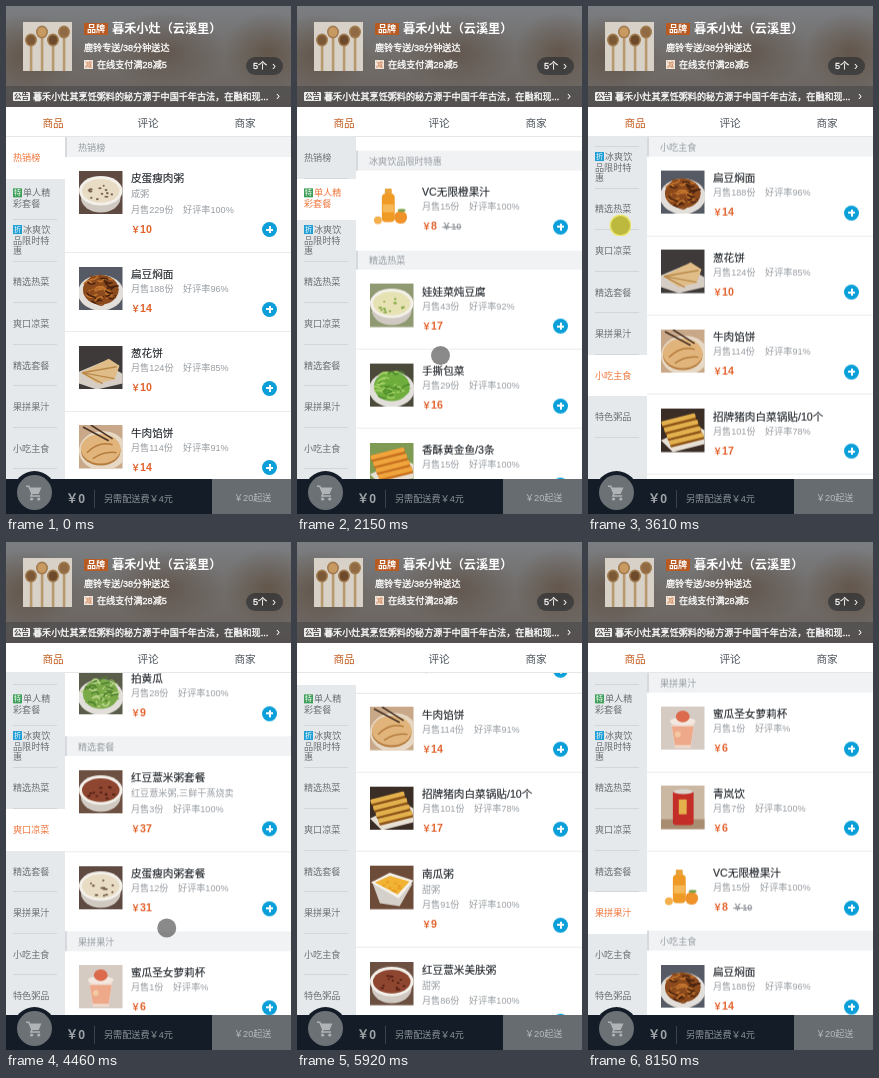
An HTML page that plays this animation: 285x508 px, repeating every 8.85 s.

```html
<!DOCTYPE html>
<html>
<head>
<meta charset="utf-8">
<title>点餐</title>
<style>
html, body { margin: 0; width: 100%; height: 100%; overflow: hidden; background: #fff; }
#stage { position: relative; width: 285px; height: 508px; overflow: hidden; background: #fff;
  font-family: "Liberation Sans", "Noto Sans CJK SC", "Noto Sans CJK", sans-serif; }
#stage div, #stage svg { position: absolute; }
.t { line-height: 14px; white-space: nowrap; }
.mid { transform: translateX(-50%); }
.b { font-weight: 700; }
.thick { -webkit-text-stroke: .3px; }
.head { left: 0; top: 0; width: 285px; height: 101px; color: #fff; overflow: hidden;
  background:
    radial-gradient(ellipse 50px 40px at 22px 48px, rgba(92,74,58,.65), transparent),
    radial-gradient(ellipse 60px 40px at 160px 45px, rgba(88,72,60,.6), transparent),
    radial-gradient(ellipse 45px 40px at 262px 46px, rgba(92,74,58,.65), transparent),
    linear-gradient(#7b7e82, #716d6a 50%, #6a635e); }
.brand { left: 78px; top: 17px; width: 24px; height: 12px; background: #b95a22; }
.cut { left: 78px; top: 54px; width: 9px; height: 9px; background: #f1e4d8; }
.pill { left: 240px; top: 51px; width: 37px; height: 18px; border-radius: 9px; background: rgba(7,17,27,.4); }
.notice { left: 0; top: 80px; width: 285px; height: 21px; background: rgba(7,17,27,.22); }
.tag { left: 7px; top: 86px; width: 17px; height: 9px; background: #eee; border-radius: 1px; }
.tabline { left: 0; top: 130px; width: 285px; height: 1px; background: #e4e6e8; }
.view { top: 131px; height: 342px; overflow: hidden; }
#menuView { left: 0; width: 59px; background: #e6e9eb; }
#listView { left: 59px; width: 226px; background: #fff; }
#menu, #list { left: 0; top: 0; will-change: transform; }
.entry { left: 0; width: 59px; height: 41.55px; font-size: 9.12px; line-height: 10.64px; color: #6b7075; }
.entry p { position: absolute; margin: 0; left: 7px; width: 43px; top: 50%; transform: translateY(-50%); }
.entry i { display: inline-block; width: 9px; height: 9px; margin-right: 1px; font: 7px/9px "Noto Sans CJK SC", sans-serif;
  color: #fff; text-align: center; vertical-align: top; }
.entry::after { content: ""; position: absolute; left: 7px; width: 44px; bottom: 0; height: 1px; background: #d2d6d9; }
.entry.on { background: #fff; color: #f0763c; }
.entry.on::after { display: none; }
.bar { left: 0; width: 224px; height: 19.8px; background: #f0f2f4; border-left: 2px solid #d6dade; }
.rule { left: 0; width: 226px; height: 1px; background: #e9ebed; }
.plus { left: 197px; width: 15px; height: 15px; border-radius: 50%; background: #0a9fd9; }
.plus::before, .plus::after { content: ""; position: absolute; background: #fff; }
.plus::before { left: 4px; top: 6.5px; width: 7px; height: 2px; }
.plus::after { left: 6.5px; top: 4px; width: 2px; height: 7px; }
.name { color: #22272c; -webkit-text-stroke: .15px; }
.grey { color: #989da2; }
.price { color: #e2622c; font-weight: 700; }
.price small { font-size: 9.12px; }
.price s { font-size: 9.12px; color: #989da2; margin-left: 5px; }
.foot { left: 0; top: 473px; width: 285px; height: 35px; background: #141d27; }
.pay { left: 206px; top: 0; width: 79px; height: 35px; background: #676c71; }
.ring { left: 7px; top: 465px; width: 43px; height: 43px; border-radius: 50%; background: #141d27; }
.cart { left: 11px; top: 469px; width: 35px; height: 35px; border-radius: 50%; background: #6c7176; }
#dot { left: -9.5px; top: -9.5px; width: 19px; height: 19px; border-radius: 50%; background: rgba(70,70,70,.63); }
#dot.press { background: #bdb83e; box-shadow: 0 0 0 1.5px rgba(236,228,80,.8); }
</style>
</head>
<body>
<div id="stage">
  <div class="view" id="menuView"><div id="menu"></div></div>
  <div class="view" id="listView"><div id="list"></div></div>
  <div class="head" id="head">
    <svg style="left:17px;top:16px" width="49" height="49" id="avatar"></svg>
    <div class="brand"></div><div class="cut"></div><div class="pill"></div>
    <div class="notice"></div><div class="tag"></div>
  </div>
  <div id="tabs"></div><div class="tabline"></div>
  <div class="foot" id="foot">
    <div class="pay"></div>
    <div style="left:88px;top:11px;width:1px;height:18px;background:#3a424a"></div>
  </div>
  <div class="ring"></div><div class="cart"></div>
  <svg style="left:20px;top:479px" width="17" height="17" viewBox="0 0 17 17">
    <path d="M0 1.2H2.8L6 8.6 5 11H14" fill="none" stroke="#b0b4b7" stroke-width="1.6"/>
    <path d="M3.6 2.5H15.5L12.6 9H6.2Z" fill="#b0b4b7"/>
    <circle cx="5.6" cy="14" r="1.6" fill="#b0b4b7"/><circle cx="12.8" cy="14" r="1.6" fill="#b0b4b7"/>
  </svg>
  <div id="dot"></div>
</div>
<script>
const $ = id => document.getElementById(id);

function add(parent, cls, css, html = '') {
  const el = document.createElement('div');
  el.className = cls;
  el.style.cssText = css;
  el.innerHTML = html;
  parent.append(el);
  return el;
}
// Text line, vertically centred on cy
const text = (parent, x, cy, size, html, cls = '', color = '') =>
  add(parent, 't ' + cls, `left:${x}px;top:${cy - 7}px;font-size:${size}px;color:${color}`, html);

// Static chrome
const S = 9.12, M = 10.64, L = 12.16;
const head = $('head'), tabs = $('tabs'), foot = $('foot');
text(head, 81, 23, S, '品牌', 'b');
text(head, 106, 23, L, '暮禾小灶（云溪里）', 'b');
text(head, 78, 42, S, '鹿铃专送/38分钟送达', 'thick');
text(head, 79, 58.5, 7, '减', '', '#c9703c');
text(head, 91, 58.5, S, '在线支付满28减5', 'thick');
text(head, 247, 60, S, '5个', 'thick');
text(head, 266, 59.5, 12, '›');
text(head, 8, 90.5, 7.5, '公告', 'b', '#4a4542');
text(head, 27, 91, S, '暮禾小灶其烹饪粥料的秘方源于中国千年古法，在融和现...', 'thick');
text(head, 270, 90, 12, '›');
text(tabs, 47, 117, M, '商品', 'mid', '#c25a1c');
text(tabs, 142, 117, M, '评论', 'mid', '#4d555d');
text(tabs, 239, 117, M, '商家', 'mid', '#4d555d');
text(foot, 60, 20, L, '￥0', 'b', '#a1a5a9');
text(foot, 98, 20, S, '另需配送费￥4元', '', '#8d9297');
text(foot, 228, 19, S, '￥20起送', '', '#b9bcbf');

// Small food pictures
let seed = 1;
const rnd = (a, b) => {
  seed = seed * 16807 % 2147483647;
  return a + (b - a) * seed / 2147483647;
};
const oval = (x, y, rx, ry, fill) => `<ellipse cx="${x}" cy="${y}" rx="${rx}" ry="${ry}" fill="${fill}"/>`;
const box = (x, y, w, h, fill, r = 0) => `<rect x="${x}" y="${y}" width="${w}" height="${h}" rx="${r}" fill="${fill}"/>`;
const path = (d, fill) => `<path d="${d}" fill="${fill}"/>`;
const line = (d, color, w) => `<path d="${d}" fill="none" stroke="${color}" stroke-width="${w}"/>`;
const many = (n, f) => Array.from({ length: n }, (_, i) => f(i)).join('');
const spot = (rx, ry) => {
  const a = rnd(0, 6.28), r = Math.sqrt(rnd(0, 1));
  return [22 + Math.cos(a) * r * rx, 22 + Math.sin(a) * r * ry];
};
const art = {
  bowl: (bg, soup, bit) => box(0, 0, 44, 44, bg) + oval(22, 27, 20, 15, '#cfc9c2') + oval(22, 20, 22, 15, '#f3f0ea') +
    oval(22, 20, 19, 12, soup) + many(12, () => oval(...spot(14, 8), rnd(1, 2.2), 1.1, bit)),
  square: (bg, soup, bit) => box(0, 0, 44, 44, bg) + path('M2 16L10 38 30 41 43 18Z', '#d5d0ca') +
    path('M1 17L20 7 44 15 29 33Z', '#f5f2ec') + path('M5 17L20 10 40 16 28 29Z', soup) +
    many(10, () => oval(...spot(10, 6), 1.6, 1, bit)),
  heap: (bg, c1, c2, c3) => box(0, 0, 44, 44, bg) + oval(22, 26, 23, 18, '#e2dfdb') + oval(22, 23, 18, 15, c1) +
    many(44, i => {
      const [x, y] = spot(16, 14);
      return line(`M${x - 4} ${y}q${rnd(2, 6)} ${rnd(-7, 7)} 8 ${rnd(-4, 4)}`, [c1, c2, c3][i % 3], 1.6);
    }),
  fan: (bg, c1, c2) => box(0, 0, 44, 44, bg) + path('M0 26L24 16 44 28V38L18 44 0 38Z', '#d6cec4') +
    path('M2 27L30 13 41 20 36 34 18 38Z', c1) + line('M3 27L38 21M3 27L36 33M3 27L24 38', c2, 1.4),
  cake: (bg, c1, c2) => box(0, 0, 44, 44, bg) + oval(24, 26, 24, 20, '#e6d8c4') + oval(22, 26, 20, 15, c2) +
    oval(22, 24, 20, 15, c1) + line('M8 28Q20 16 34 20M14 34Q26 26 38 28', c2, 1.4) + line('M4 2L30 16M12 0L34 14', '#4a3426', 1.6),
  rolls: (bg, c1, c2) => box(0, 0, 44, 44, bg) + path('M0 32L34 16 44 22V36L12 44Z', '#e7e0d4') +
    `<g transform="rotate(-14 22 22)">${many(4, i => box(3 + i, 8 + i * 7, 35, 7, c2, 1) + box(3 + i, 8 + i * 7, 35, 4.5, c1, 1))}</g>`,
  juice: () => box(0, 0, 44, 44, '#fff') + box(15, 4, 7, 6, '#e9a23a', 1) + box(12, 9, 13, 29, '#f09a26', 4) +
    box(13, 20, 11, 8, '#f6b95a') + oval(31, 33, 6.5, 6.5, '#f0922a') + oval(8, 36, 4, 4, '#f5b04c') + oval(32, 26, 4, 1.5, '#7da44a'),
  cup: () => box(0, 0, 44, 44, '#d5cbc2') + path('M10 15H34L30 42H14Z', '#efd9cc') + path('M11 20H33L30 39H14Z', '#eda98a') +
    oval(22, 15, 13, 4, '#f3e8e0') + oval(22, 10, 7, 6, '#dc6b4e') + oval(17, 28, 3, 3, '#f3c9a4'),
  can: () => box(0, 0, 44, 44, '#cbb8a2') + box(0, 34, 44, 10, '#a98d72') + box(12, 5, 21, 35, '#c32f28', 3) +
    oval(22.5, 6, 10, 2.5, '#d9d4cd') + box(18, 14, 8, 15, '#e3b04b')
};

const dish = (name, sold, rate, price, pic, desc, old) => ({ name, sold, rate, price, pic, desc, old });
const pickle = ['heap', '#3b2c28', '#a5481a', '#d07628', '#70260f'];
const egg = dish('皮蛋瘦肉粥', 229, 100, 10, ['bowl', '#5e4a41', '#e9dcc4', '#7d6656'], ['咸粥']);
const noodle = dish('扁豆焖面', 188, 96, 14, ['heap', '#565a64', '#8c4a1d', '#c4762f', '#4a2410']);
const scallion = dish('葱花饼', 124, 85, 10, ['fan', '#3d3a39', '#e0bd88', '#b98a4c']);
const pie = dish('牛肉馅饼', 114, 91, 14, ['cake', '#c8a888', '#e0b47a', '#b67c3e']);
const potsticker = dish('招牌猪肉白菜锅贴/10个', 101, 78, 17, ['rolls', '#3a2d26', '#e2b04c', '#8f5518']);
const pumpkin = dish('南瓜粥', 91, 100, 9, ['square', '#6c4b38', '#f2b233', '#e59a20'], ['甜粥']);
const bean = dish('红豆薏米美肤粥', 86, 100, 12, ['bowl', '#6c5142', '#8e4631', '#5c2417'], ['甜粥']);
const sauce = dish('八宝酱菜', 84, 100, 4, pickle);
const date = dish('红枣山药糙米粥', 81, 91, 10, pickle);
const hash = dish('糊塌子', 80, 93, 10, ['fan', '#4d4542', '#e3c67c', '#b98f45']);
const juice = dish('VC无限橙果汁', 15, 100, 8, ['juice'], null, 10);
const groups = [
  ['热销榜', [egg, noodle, scallion, pie, potsticker, pumpkin, bean, sauce, date, hash]],
  ['单人精彩套餐', [dish('红枣山药粥套餐', 17, 100, 29, pickle, ['红枣山药糙米粥,素材包,爽口莴', '笋丝,四川泡菜或八宝酱菜'], 36)], '特', '#3fa05a'],
  ['冰爽饮品限时特惠', [juice], '折', '#1f9fd6'],
  ['精选热菜', [
    dish('娃娃菜炖豆腐', 43, 92, 17, ['bowl', '#8f9a72', '#e6e2b4', '#8fb052']),
    dish('手撕包菜', 29, 100, 16, ['heap', '#4b4a3a', '#6fae3e', '#a5d264', '#4d8a2a']),
    dish('香酥黄金鱼/3条', 15, 100, 11, ['rolls', '#7f9a52', '#f0a53c', '#c8701e'])]],
  ['爽口凉菜', [sauce, dish('拍黄瓜', 28, 100, 9, ['heap', '#5a5d4a', '#7bab48', '#b9d487', '#4f8030'])]],
  ['精选套餐', [
    dish('红豆薏米粥套餐', 3, 100, 37, bean.pic, ['红豆薏米粥,三鲜干蒸烧卖']),
    dish('皮蛋瘦肉粥套餐', 12, 100, 31, egg.pic)]],
  ['果拼果汁', [dish('蜜瓜圣女萝莉杯', 1, '', 6, ['cup']), dish('青岚饮', 7, 100, 6, ['can']), juice]],
  ['小吃主食', [noodle, scallion, pie, potsticker, hash]],
  ['特色粥品', [egg, pumpkin, bean, date,
    dish('鲜蔬菌菇粥', 56, 100, 10, ['bowl', '#66564a', '#e6dcc0', '#8a9a50']),
    dish('田园蔬菜粥', 33, 100, 10, ['bowl', '#66564a', '#e4e0c2', '#78a04a'])]]
];

// Build menu and list
const BAR = 19.8, GAP = 13.7, ROW = 41.55, TEXT_X = 66;
const menu = $('menu'), list = $('list'), tops = [], entries = [];
let y = 0;

function addDish(d, last) {
  const lines = d.desc || [], [kind, ...colors] = d.pic;
  const shift = lines.length ? 16.6 + 9 * (lines.length - 1) : 0;
  const top = y + GAP;
  seed = d.name.length * 977 + d.sold;
  add(list, '', `left:14px;top:${top}px`,
    `<svg width="43.5" height="43.5" viewBox="0 0 44 44" style="left:0;top:0">${art[kind](...colors)}</svg>`);
  text(list, TEXT_X, top + 7.5, M, d.name, 'name');
  lines.forEach((s, i) => text(list, TEXT_X, top + 23.5 + 9 * i, S, s, 'grey'));
  text(list, TEXT_X, top + 22.5 + shift, S, `月售${d.sold}份`, 'grey');
  text(list, TEXT_X + 36.9 + String(d.sold).length * 5.07, top + 22.5 + shift, S, `好评率${d.rate}%`, 'grey');
  text(list, TEXT_X, top + 41.5 + shift, M, `<small>￥</small>${d.price}` + (d.old ? `<s>￥${d.old}</s>` : ''), 'price');
  add(list, 'plus', `top:${top + 35 + shift}px`);
  y += 79.4 + shift;
  if (!last) add(list, 'rule', `top:${y - 1}px`);
}

groups.forEach(([title, dishes, mark, color], i) => {
  const icon = mark ? `<i style="background:${color}">${mark}</i>` : '';
  entries.push(add(menu, 'entry', `top:${i * ROW}px`, `<p>${icon}${title}</p>`));
  tops.push(y);
  add(list, 'bar', `top:${y}px`);
  text(list, 13, y + 10.5, S, title, 'grey');
  y += BAR;
  dishes.forEach((d, k) => addDish(d, k === dishes.length - 1));
});

// Wooden spoons in the shop picture
$('avatar').innerHTML = box(0, 0, 49, 49, '#d8d1c8') + many(4, i => {
  const x = 8 + i * 11, top = i % 2 ? 10 : 18;
  return box(x - 1.2, top, 2.6, 40, '#b8996f') + oval(x, top, 6, 6.5, '#a27c50') +
    oval(x, top, 4.4, 4.8, ['#7b5836', '#c79a62', '#6d4a2c', '#8f6a45'][i]);
});

// Motion: [tick, value...] keys, 13 ticks a second
const LOOP = 8850, TICK = 76.9;
const out = k => k * (2 - k), lin = k => k, soft = k => k * k * (3 - 2 * k);
function track(keys, n, ease) {
  if (n <= keys[0][0]) return keys[0].slice(1);
  const i = keys.findIndex(k => k[0] > n);
  if (i < 0) return keys[keys.length - 1].slice(1);
  const a = keys[i - 1], b = keys[i];
  const k = ease((n - a[0]) / (b[0] - a[0]));
  return a.slice(1).map((v, j) => v + (b[j + 1] - v) * k);
}
const scrollKeys = [[9, 0], [14, 170], [21, 430], [22, 430], [28, 974.4], [34, 1170], [36, 1180], [41, tops[7]],
  [53, tops[7]], [57, 1700], [66, 560], [71, 330], [77, 254.3], [84, 195], [93, 232.2], [99, 225], [105, tops[6]]];
const menuKeys = [[41, 0], [47, 73], [53, 30]];
const dotKeys = [[1, 14, 464], [7, 203, 314], [9, 203, 314], [21, 150, 170], [22, 150, 170], [24, 150, 440], [28, 143, 349],
  [33, 130, 220], [36, 32, 440], [39, 32, 420], [41, 32, 378], [47, 32, 219], [52, 150, 230], [57, 160, 440], [60, 161, 230],
  [66, 161, 299], [71, 160, 477], [76, 150, 502], [82, 120, 500], [93, 120, 409], [98, 32, 370], [102, 32, 370]];
const within = (n, a, b) => n >= a && n <= b;
const start = performance.now();
const dot = $('dot');

function draw(now) {
  const t = Math.max(0, now - start) % LOOP;
  const n = Math.floor((t + 15) / TICK);
  const [pos] = track(scrollKeys, n, out);
  const [shift] = track(menuKeys, n, lin);
  const [x, cy] = track(dotKeys, n, soft);
  const current = tops.filter(top => top <= pos + .5).length - 1;
  list.style.transform = `translateY(${-pos}px)`;
  menu.style.transform = `translateY(${-shift}px)`;
  entries.forEach((e, i) => e.classList.toggle('on', i === current));
  dot.style.transform = `translate(${x}px, ${cy}px)`;
  dot.style.display = within(n, 1, 75) || within(n, 82, 102) ? '' : 'none';
  dot.classList.toggle('press', within(n, 36, 47) || within(n, 98, 102));
  requestAnimationFrame(draw);
}
draw(start);
</script>
</body>
</html>
```
